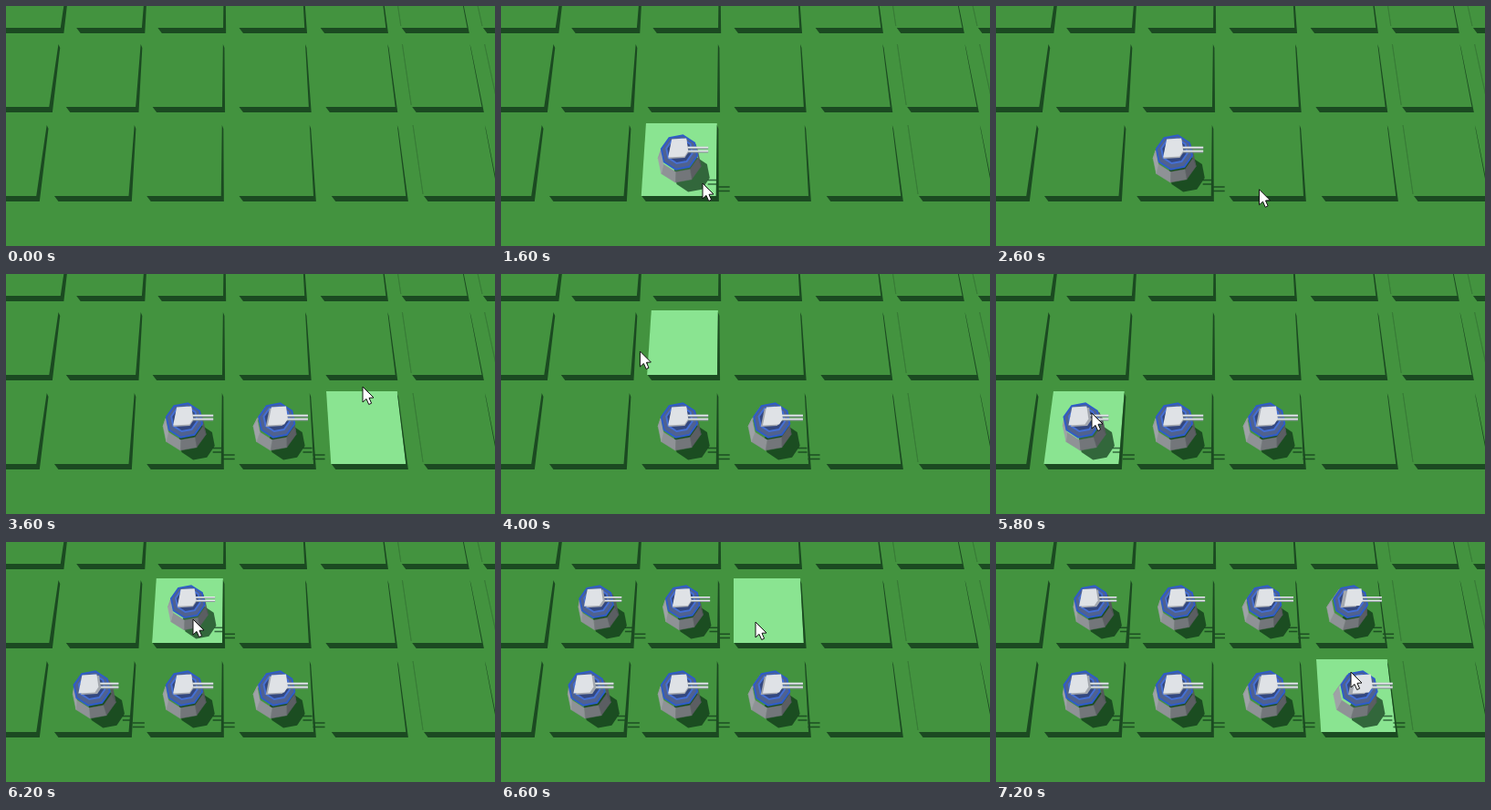
Animation of 536x264 px, one loop 8100 ms. Source, as an HTML page with a canvas:

```html
<!DOCTYPE html>
<html lang="en">
<head>
<meta charset="utf-8">
<title>Tower placement</title>
<style>
html, body { margin: 0; width: 100%; height: 100%; overflow: hidden; background: #43933f; }
canvas { display: block; }
</style>
</head>
<body>
<canvas id="stage" width="536" height="264"></canvas>
<script>
const ctx = document.getElementById('stage').getContext('2d');
const LOOP = 8100, STEP = 100, TILE = 0.81;
const GRASS = '#43933f', DARK = '#1b4a21', LIT = '#8ae491';
const rows = [[-42, 24], [40, 111], [129, 209]]; // top and bottom of each row of tiles

// Cursor moves: start time, duration, destination
const moves = [
  [100, 700, 221, 195], [2100, 300, 266, 219], [2500, 200, 296, 196],
  [3300, 300, 391, 124], [3600, 100, 375, 85], [3700, 500, 110, 85],
  [4200, 200, 105, 153], [5800, 200, 205, 85], [6200, 100, 110, 85],
  [6400, 100, 279, 88], [6700, 100, 375, 88], [6900, 200, 389, 143]
];
// A click builds on the tile hovered at that time
const clicks = [1600, 3100, 5800, 6200, 6400, 6700, 6900, 7200];

const spacing = y => 90.2 + 0.0655 * (y - 40);
const gridX = (u, y) => 255 + (u - 3) * spacing(y);

function cursorAt(t) {
  let x = 270, y = 275;
  for (const [start, length, toX, toY] of moves) {
    const k = Math.min(1, Math.max(0, (t - start) / length));
    const ease = 1 - (1 - k) ** 2;
    x += (toX - x) * ease;
    y += (toY - y) * ease;
  }
  return [x, y];
}

// The highlight trails the cursor by one step
function hoveredTile(t) {
  const [x, tip] = cursorAt(t - STEP), y = tip + 6;
  const row = rows.findIndex(([top, bot]) => y >= top && y <= bot);
  const u = 3 + (x - 255) / spacing(y), col = Math.floor(u);
  return row >= 0 && u - col <= TILE ? [row, col] : null;
}
const towers = clicks.map(time => ({ time, tile: hoveredTile(time) }));

function trace(points) {
  ctx.beginPath();
  points.forEach(([x, y]) => ctx.lineTo(x, y));
  ctx.closePath();
}
function fill(color, points) {
  trace(points);
  ctx.fillStyle = color;
  ctx.fill();
}
function outline(color, width, points) {
  trace(points);
  ctx.strokeStyle = color;
  ctx.lineWidth = width;
  ctx.stroke();
}
const line = (color, width, ...ends) => outline(color, width, ends);
const octagon = (cx, cy, rx, ry) => Array.from({ length: 8 }, (_, i) => {
  const a = 0.2 + i * Math.PI / 4;
  return [cx + rx * Math.cos(a), cy + ry * Math.sin(a)];
});

function tileEdges(r, c) {
  const [top, bot] = rows[r], w = 3.6 - 0.25 * c;
  const right = y => gridX(c + TILE, y), left = gridX(c, bot);
  fill(DARK, [
    [right(top), top + 2], [right(top) + w / 2, top + 6], [right(bot) + w, bot + 6],
    [left + 5, bot + 6], [left + 0.5, bot], [right(bot), bot]
  ]);
  if (c > 4) line('#387c36', 0.8, [gridX(c, top) - 1, top + 2], [left - 0.5, bot - 2]);
}

function litTile(r, c) {
  const [top, bot] = rows[r];
  fill(LIT, [
    [gridX(c, top), top], [gridX(c + TILE, top), top],
    [gridX(c + TILE, bot), bot], [gridX(c, bot), bot]
  ]);
}

function placeTower([r, c], draw) {
  const y = r === 2 ? 172 : 76, x = gridX(c + 0.4, y);
  ctx.save();
  ctx.translate(x, y);
  ctx.scale(spacing(y) / spacing(172), spacing(y) / spacing(172));
  draw((x - 206) * 0.05);
  ctx.restore();
}

function towerShadow() {
  const shade = 'rgba(10, 45, 20, 0.68)';
  fill(shade, octagon(13.5, 13, 20, 20));
  for (const y of [19.5, 24]) {
    line(shade, 1.6, [31, y], [41, y]);
    line(shade, 1.6, [42, y + 7.5], [55, y + 7.5]);
  }
}

function tower(lean) {
  const mid = lean / 2, foot = octagon(0, 0, 24, 22.5), rim = octagon(mid * 0.6, -9, 21, 20);
  // stone facets, lit from the left
  foot.forEach((p, i) => {
    const j = (i + 1) % 8, light = 122 - 38 * Math.cos(0.6 + i * Math.PI / 4);
    const color = `rgb(${light}, ${light + 3}, ${light + 7})`;
    fill(color, [p, foot[j], rim[j], rim[i]]);
    outline(color, 0.5, [p, foot[j], rim[j], rim[i]]);
  });
  // blue rings
  [['#50628f', '#2f5cc8', 20], ['#34487f', '#456fd4', 14.5]].forEach(([inside, edge, radius], i) => {
    const ring = octagon(mid, -11 - i * 1.5, radius, radius * 0.95);
    fill(inside, ring);
    outline(edge, 2, ring);
  });
  // twin barrels and head
  for (const y of [-16.5, -12.5]) {
    line('#8c979c', 2.6, [8 + lean, y + 0.6], [32 + lean, y + 0.6]);
    line('#e8ecee', 1.4, [8 + lean, y], [32 + lean, y]);
  }
  const head = (x, y) => [[x - 8, y - 10], [x + 8, y - 11], [x + 10, y + 3], [x + 6, y + 9], [x - 12, y + 10]];
  fill('#a4a8af', head(mid, -14));
  fill('#dfe2e6', head(lean, -15.5));
}

function cursor(x, y) {
  const arrow = [[0, 0], [0, 17], [4, 13.4], [6.7, 19.5], [9.6, 18.2], [7, 12.3], [12, 12]]
    .map(([dx, dy]) => [x + dx, y + dy]);
  fill('#fff', arrow);
  outline('#111', 1, arrow);
}

function render(t) {
  const hovered = hoveredTile(t), built = towers.filter(b => b.time <= t);
  ctx.fillStyle = GRASS;
  ctx.fillRect(0, 0, 536, 264);
  if (hovered) litTile(...hovered);
  built.forEach(b => placeTower(b.tile, towerShadow));
  for (let r = 0; r < 3; r++) for (let c = 0; c < 7; c++) tileEdges(r, c);
  built.forEach(b => placeTower(b.tile, tower));
  cursor(...cursorAt(t));
}

function tick() {
  const t = performance.now() % LOOP;
  render(Math.floor(t / STEP) * STEP);
  requestAnimationFrame(tick);
}
tick();
</script>
</body>
</html>
```
